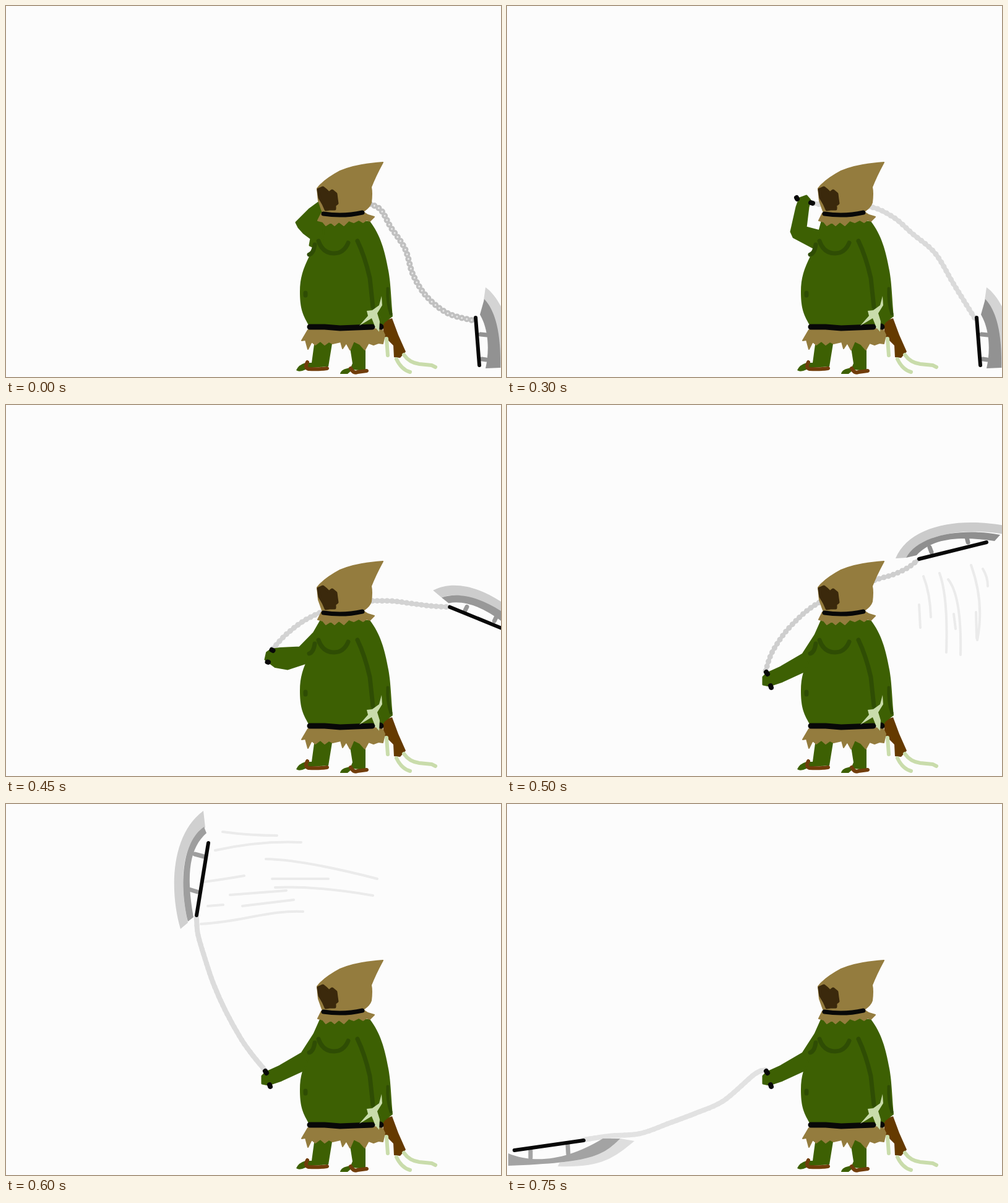
Recreate the animation shown at these times as an HTML page. Size 800x600 px, loop 1.05 s.

```html
<!DOCTYPE html>
<html lang="en">
<head>
<meta charset="utf-8">
<title>Hooded swing</title>
<style>
  html, body { margin: 0; width: 100%; height: 100%; overflow: hidden; background: #fcfcfc; }
  svg { display: block; width: 100%; height: 100%; }
  path { fill: none; stroke-linecap: round; stroke-linejoin: round; }
  .green { fill: #3d6003; }
  .tan { fill: #947c3e; stroke: #947c3e; stroke-width: 2; }
  .shade { stroke: #2f4d04; stroke-width: 7; }
  .black { stroke: #080808; }
  .shoe { stroke: #713d0b; stroke-width: 6; }
  .stick { fill: #653a00; }
  .claw { stroke: #c9dcab; stroke-width: 6; }
  #arm { stroke: #3d6003; stroke-width: 3; }
  #streaks { stroke: #ebebeb; stroke-width: 4; }
  #struts { stroke-width: 7; }
</style>
</head>
<body>
<svg viewBox="0 0 800 600">
  <path id="streaks"/>
  <path id="chain"/>
  <path id="beads" stroke-dasharray="0 8"/>
  <path id="holes" stroke="#e8e8e8" stroke-width="3" stroke-dasharray="0 8"/>
  <path id="light"/>
  <path id="dark"/>
  <path id="struts"/>
  <path id="handle" class="black"/>

  <path class="green" d="M499 540 L528 540 L521 583 L494 585 L484 588 Q474 593 469 589 Q473 580 484 577 L494 577 Z"/>
  <path class="green" d="M554 540 L581 540 L581 590 L560 588 L552 595 L540 595 Q541 587 557 585 L560 578 Z"/>
  <path class="shoe" d="M487 576 Q482 585 489 587 Q505 588 519 586 M557 586 Q562 595 568 592 L583 590"/>
  <path class="stick" d="M608 510 L624 505 L634 532 L646 559 L637 569 L627 568 L626 549 L611 534 Z"/>
  <path class="claw" d="M615 538 L617 565 M631 571 Q639 588 653 592 M643 564 Q652 577 668 579 L688 581 L694 584"/>
  <path class="tan" d="M488 524 L478 541 L484 540 L488 555 L494 543 L500 548 L508 542 L515 548 L522 543 L528 546 L541 543 L544 554 L550 545 L556 556 L562 542 L572 547 L580 556 L586 545 L594 548 L602 545 L609 546 L612 532 L607 522 Z"/>
  <path class="green" d="M509 343 L503 365 L491 403 C480 425 475 440 475 462 C475 490 480 500 489 516 L607 520 L612 512 L625 502 C622 470 622 450 618 428 C612 395 605 370 588 348 Z"/>
  <path id="arm" class="green"/>
  <path class="shade" d="M505 380 Q512 400 530 400 Q546 400 553 383 M568 380 Q580 405 588 440 L593 487 M499 386 Q497 400 490 402 M484 464 L484 468"/>
  <path class="shade" style="stroke-width:5" d="M617 457 Q616 480 622 498"/>
  <path class="black" stroke-width="9" d="M491 519 L515 519 L540 521 L565 520 L592 519 M605 518 L606 519"/>
  <path fill="#c9dcab" style="fill:#c9dcab" d="M607 469 L608 484 L600 497 L604 510 L603 527 L597 520 L591 505 L571 517 L585 501 L583 493 L592 492 L603 484 Z"/>

  <path class="tan" d="M510 335 L504 347 L512 349 L517 355 L525 350 L531 355 L538 349 L546 355 L554 347 L562 350 L570 346 L577 350 L583 346 L588 348 L595 341 L585 338 L577 333 Z"/>
  <path class="tan" d="M609 253 Q565 256 540 267 Q514 281 503 295 L505 315 L511 332 Q545 341 578 332 Q588 325 590 318 Q592 302 590 293 Q597 275 609 253 Z"/>
  <path style="fill:#3b290c" stroke="#3b290c" stroke-width="5" d="M505 297 L512 294 L517 298 L522 303 L527 299 L533 304 L534 312 L535 319 L531 322 L531 328 L523 328 L517 329 L513 320 L507 310 Z"/>
  <path class="black" stroke-width="7" d="M513 336 Q545 341 576 334"/>
  <path id="grip" class="black" stroke-width="8"/>
</svg>
<script>
const LOOP = 1050;

const RESTING_BLADE = {
  light: "M775 455 C800 472 825 530 822 588 L798 585 C800 545 792 500 772 476 Z",
  dark: "M773 474 C793 495 800 535 799 585 L775 586 C781 560 781 525 766 499 Z",
  handle: "M759 504 L765 581",
  struts: "M767 531 L777 532 M769 571 L776 572"
};
const LOWERED_ARM = {
  arm: "M510 345 L498 372 L478 403 L442 424 L420 434 L414 440 L414 452 L424 454 L445 447 L482 430 Z",
  grip: "M426 454 L427 457 M419 432 L421 435"
};

// turn: direction from hand to blade; greys: blade edge, blade back, chain.
const poses = [
  { ...RESTING_BLADE, turn: 40, greys: [212, 146, 192], line: 4, bead: 10, holes: true, grip: "",
    arm: "M515 345 L510 320 L505 318 L490 329 L469 350 L473 358 L481 367 L493 376 L491 387 L510 395 Z",
    chain: "M588 320 L606 330 L622 358 L645 393 L658 435 L680 470 L714 497 L757 509" },
  { ...RESTING_BLADE, turn: 40, greys: [212, 146, 212], line: 4, bead: 9, grip: "",
    arm: "M515 345 L509 325 L497 328 L486 334 L485 341 L488 355 L492 367 L494 378 L490 393 L510 395 Z",
    chain: "M583 332 L604 347 L632 382 L645 422 L660 466 L684 507 L724 522 L757 508" },
  { ...RESTING_BLADE, turn: 35, greys: [212, 146, 218], line: 7, bead: 9,
    arm: "M506 364 L483 358 L487 325 L490 314 L484 307 L473 311 L468 325 L459 365 L463 374 L495 391 Z",
    grip: "M468 310 L469 312 M491 318 L494 319",
    chain: "M496 319 L540 326 L588 325 L625 342 L655 368 L692 400 L722 450 L756 505" },
  { turn: 8, greys: [207, 160, 216], line: 7, bead: 9,
    light: "M718 362 C770 375 800 440 803 515 L790 508 C785 460 755 395 722 383 Z",
    dark: "M722 383 C760 398 795 450 792 508 L778 500 C775 460 750 415 721 399 Z",
    handle: "M721 405 L772 493",
    struts: "M738 430 L747 427 M762 465 L770 461",
    arm: "M508 352 L497 365 L471 381 L444 363 L437 357 L429 361 L424 371 L446 393 L465 407 L492 403 Z",
    grip: "M419 377 L421 375 M440 360 L442 359",
    chain: "M445 358 L475 345 L512 333 L580 330 L620 337 L655 357 L690 382 L720 404" },
  { ...LOWERED_ARM, turn: -37, greys: [203, 143, 206], line: 6, bead: 9,
    light: "M628 248 C650 195 730 180 810 196 L808 210 C750 198 670 205 645 247 Z",
    dark: "M645 247 C665 210 735 198 797 210 L788 220 C740 213 690 212 662 243 Z",
    handle: "M666 249 L775 222",
    struts: "M686 238 L683 230 M745 222 L743 214",
    chain: "M418 430 L430 397 L460 356 L507 318 L590 285 L625 274 L648 263 L665 250",
    streaks: "M666 323 L668 360 M673 277 Q684 305 685 343 M699 272 Q713 310 710 400 M713 282 Q735 310 733 404 M722 338 L725 362 M750 259 Q772 320 760 380 M758 335 L759 377 M769 265 Q777 278 777 293" },
  { ...LOWERED_ARM, turn: -114, greys: [208, 158, 220], line: 8, bead: 8,
    light: "M282 202 C264 140 266 50 319 11 L322 38 C282 62 280 130 294 192 Z",
    dark: "M294 190 C280 130 284 62 320 37 L324 47 C298 70 290 110 303 183 Z",
    handle: "M308 180 L327 63",
    struts: "M309 142 L296 138 M320 85 L305 81",
    chain: "M420 432 L400 408 L380 380 L355 335 L335 290 L320 245 L310 210 L308 184",
    streaks: "M350 45 Q395 51 438 51 M338 75 Q410 59 477 62 M420 89 Q480 90 600 121 M320 126 Q350 122 385 116 M430 121 L521 121 M435 135 Q500 132 593 148 M362 147 L453 140 M382 165 L465 155 M326 165 L351 163 M315 194 Q350 192 400 182 T480 174" },
  { ...LOWERED_ARM, turn: -201, greys: [222, 163, 226], line: 8, bead: 8,
    light: "M206 545 C170 575 150 588 82 586 L85 580 C130 575 160 555 183 541 Z",
    dark: "M183 541 C155 568 140 580 2 585 L2 565 C45 583 100 575 155 541 Z",
    handle: "M124 544 Q70 547 12 560".replace("Q70 547 ", "L"),
    struts: "M98 550 L99 566 M38 559 L38 572",
    chain: "M418 430 L400 437 L350 480 L305 500 L260 517 L215 533 L165 537 L124 543" }
];

// Pose shown at each 50 ms step of the swing, which begins at 300 ms.
const swing = [2, 2.5, 3, 3.5, 4, 4.5, 5, 5.33, 5.67, 6];
const NUMBER = /-?\d+(\.\d+)?/g;
const el = id => document.getElementById(id);
const numbers = path => (path.match(NUMBER) || []).map(Number);
const mix = (a, b, u) => a + (b - a) * u;
const mixAll = (a, b, u) => a.map((v, i) => mix(v, b[i], u));
const grey = v => `rgb(${v},${v},${v})`;

function refill(path, values) {
  let i = 0;
  return path.replace(NUMBER, () => values[i++].toFixed(1));
}

function rotate(values, degrees) {
  const c = Math.cos(degrees * Math.PI / 180), s = Math.sin(degrees * Math.PI / 180);
  return values.map((v, i) => i % 2 ? values[i - 1] * s + v * c : v * c - values[i + 1] * s);
}

const shift = (values, [x, y], sign) => values.map((v, i) => v + sign * (i % 2 ? y : x));
const handOf = pose => numbers(pose.chain).slice(0, 2);
const toSwing = (pose, key) => rotate(shift(numbers(pose[key]), handOf(pose), -1), -pose.turn);

// Catmull-Rom curve through a flat list of coordinates.
function curve(v) {
  const last = v.length / 2 - 1;
  const at = i => { const k = Math.max(0, Math.min(last, i)) * 2; return [v[k], v[k + 1]]; };
  let d = `M${at(0)}`;
  for (let i = 0; i < last; i++) {
    const [p, a, b, q] = [at(i - 1), at(i), at(i + 1), at(i + 2)];
    d += `C${a.map((n, k) => n + (b[k] - p[k]) / 6)} ${b.map((n, k) => n - (q[k] - a[k]) / 6)} ${b}`;
  }
  return d;
}

function draw(position) {
  const from = poses[Math.floor(position)], to = poses[Math.ceil(position)];
  const u = position % 1;
  const turn = mix(from.turn, to.turn, u);
  const hand = mixAll(handOf(from), handOf(to), u);
  const swung = key => shift(rotate(mixAll(toSwing(from, key), toSwing(to, key), u), turn), hand, 1);
  const set = (id, attrs) => { for (const k in attrs) el(id).setAttribute(k, attrs[k]); };
  const [light, dark, link] = mixAll(from.greys, to.greys, u).map(v => grey(Math.round(v)));

  for (const key of ["light", "dark", "handle", "struts"]) set(key, { d: refill(from[key], swung(key)) });
  el("light").style.fill = light;
  el("dark").style.fill = dark;
  set("struts", { stroke: dark });
  set("handle", { "stroke-width": 6 });

  const d = curve(swung("chain"));
  set("chain", { d, stroke: link, "stroke-width": mix(from.line, to.line, u) });
  set("beads", { d, stroke: link, "stroke-width": mix(from.bead, to.bead, u) });
  set("holes", { d: from.holes ? d : "" });

  for (const key of ["arm", "grip"])
    set(key, { d: refill(from[key], mixAll(numbers(from[key]), numbers(to[key]), u)) });

  const trail = u && u < 0.6 && position > 4 ? poses[5] : u ? {} : from;
  set("streaks", {
    d: trail.streaks || "",
    transform: trail.streaks ? `rotate(${turn - trail.turn} ${hand})` : ""
  });
}

let shown = -1;
function frame(now) {
  const t = now % LOOP;
  const position = t < 150 ? 0 : t < 300 ? 1 : swing[Math.min(9, Math.floor((t - 300) / 50))];
  if (position !== shown) draw(shown = position);
  requestAnimationFrame(frame);
}
draw(0);
requestAnimationFrame(start => {
  const tick = now => { frame.call(null, now); };
  tick(start);
});
</script>
</body>
</html>
```
